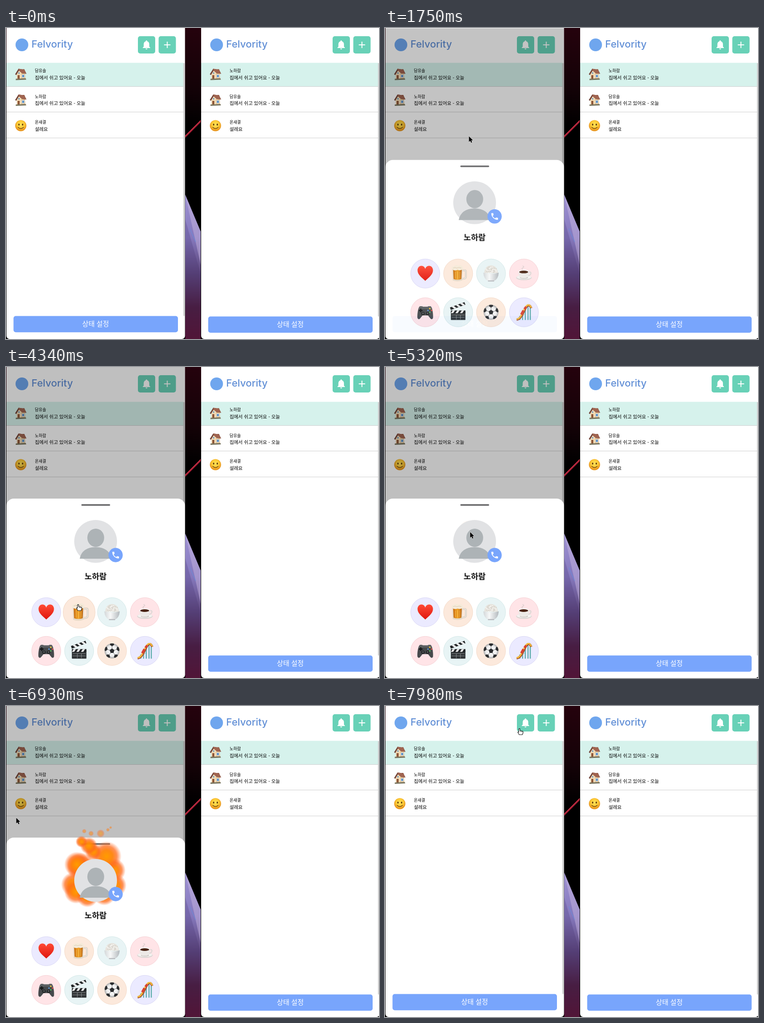
An HTML page that plays this animation: 820x683 px, repeating every 8 s.

```html
<!DOCTYPE html>
<html lang="ko">
<head>
<meta charset="utf-8">
<title>Status board</title>
<style>
html, body { margin: 0; width: 100%; height: 100%; overflow: hidden; background: #000; }
svg { display: block; width: 820px; height: 683px; font-family: "Noto Sans CJK KR", "Noto Sans CJK", "Noto Sans", sans-serif; }
.brand { font: 500 22px Inter, sans-serif; fill: #618fd6; }
.who { font-size: 9px; }
.mood { font-size: 10.4px; font-weight: 500; }
.cta { font-size: 14.9px; font-weight: 500; fill: #fff; text-anchor: middle; }
.name { font-size: 17.6px; font-weight: 600; text-anchor: middle; fill: #111; }
</style>
</head>
<body>
<svg id="stage" viewBox="0 0 820 683" xmlns="http://www.w3.org/2000/svg"></svg>
<script>
const LOOP = 8000;
const stage = document.getElementById('stage');
const BELL = 'M12 22c1.1 0 2-.9 2-2h-4c0 1.1.89 2 2 2zm6-6v-5c0-3.07-1.64-5.64-4.5-6.32V4c0-.83-.67-1.5-1.5-1.5s-1.5.67-1.5 1.5v.68C7.63 5.36 6 7.92 6 11v5l-2 2v1h16v-1l-2-2z';
const PHONE = 'M6.6 10.8c1.4 2.8 3.8 5.1 6.6 6.6l2.2-2.2c.3-.3.7-.4 1-.2 1.1.4 2.3.6 3.6.6.6 0 1 .4 1 1V20c0 .6-.4 1-1 1-9.4 0-17-7.6-17-17 0-.6.4-1 1-1h3.5c.6 0 1 .4 1 1 0 1.2.2 2.4.6 3.6.1.3 0 .7-.3 1l-2.2 2.2z';

const at = (x, y, body, s = 1, id = '') =>
  `<g ${id && `id="${id}"`} transform="translate(${x} ${y}) scale(${s})">${body}</g>`;
const path = (d, fill, more = '') => `<path d="${d}" fill="${fill}" ${more}/>`;
const line = (d, stroke, w, more = '') => path(d, 'none', `stroke="${stroke}" stroke-width="${w}" ${more}`);
const rect = (x, y, w, h, fill, r = 0, more = '') =>
  `<rect x="${x}" y="${y}" width="${w}" height="${h}" rx="${r}" fill="${fill}" ${more}/>`;
const oval = (x, y, rx, ry, fill, more = '') =>
  `<ellipse cx="${x}" cy="${y}" rx="${rx}" ry="${ry}" fill="${fill}" ${more}/>`;
const text = (x, y, cls, s) => `<text x="${x}" y="${y}" class="${cls}">${s}</text>`;
const grad = (id, kind, stops, more = '') => `<${kind}Gradient id="${id}" ${more}>` +
  stops.map(([o, c, a = 1]) => `<stop offset="${o}" stop-color="${c}" stop-opacity="${a}"/>`).join('') +
  `</${kind}Gradient>`;

// Pictograms, centred on 0,0
const house =
  rect(4, -11, 4, 7, '#8a4a3b') +
  path('M-9-1L-4-8L9-6L10 10L-9 11Z', '#f3dcb6') +
  path('M1-4L9-3L10 10L1 11Z', '#dfc194') +
  path('M-12.5 0L-5-12L8-10L12.5-1L3-2L-4-8L-10 2Z', '#74463a') +
  path('M-4-8L-5-12L8-10L12 -1L3-2Z', '#a06450') +
  rect(-7, 2, 4.5, 9, '#8d5638') + rect(2.5, 1, 5.5, 6, '#5d91c4', .5, 'stroke="#fff" stroke-width=".8"') +
  rect(-5.5, -4, 3, 3, '#6d99bd') +
  path('M-11 10L11 9L12 12L-11 13Z', '#79755f');
const smile =
  oval(0, 0, 12.3, 12.2, 'url(#face)') +
  oval(-4, -2.4, 1.5, 2.2, '#5f3a0c') + oval(4, -2.4, 1.5, 2.2, '#5f3a0c') +
  line('M-6 3.5Q0 9.2 6 3.5', '#6d430f', 1.4, 'stroke-linecap="round"');
const heart = path('M0 16C-6 10-17 3-17-7C-17-13-13-17-8.500-17C-4-17-1-14 0-10C1-14 4-17 8.500-17C13-17 17-13 17-7C17 3 6 10 0 16Z', 'url(#red)');
const beer =
  line('M8-7H15Q17-7 17-4V7Q17 10 14 11L8 12', '#cfc6ba', 3.6) +
  line('M8-7H15Q17-7 17-4V7Q17 10 14 11L8 12', '#f4efe8', 1.4) +
  path('M-13-12H10L9 15Q-2 19-12 15Z', '#e6d9c6') +
  path('M-11-10H8L7 12Q-2 15-10 12Z', 'url(#ale)') +
  line('M-6-4V11M-1-4V12M4-4V11', '#ffd06a', 1.2, 'opacity=".6"') +
  path('M-14-10Q-16-16-9-16Q-5-20 0-17Q7-20 10-14Q13-8 7-8Q3-6-1-8Q-8-5-14-10Z', '#f5ead9') +
  line('M-11-12Q-7-15-3-12Q2-15 7-12', '#dbcab2', 1);
const grains = Array.from({ length: 30 }, (_, i) => {
  const a = i * 2.4, r = 2.4 * Math.sqrt(i);
  return oval((r * Math.cos(a)).toFixed(1), (-8 + r * Math.sin(a) * .55).toFixed(1), 1.3, .8, i % 2 ? '#fff' : '#cdcac2');
}).join('');
const rice =
  path('M-15-1Q-14-17 0-18Q14-17 15-1Z', '#e6e3dc') + grains +
  path('M-17-2Q0 3 17-2Q16 12 7 16H-7Q-16 12-17-2Z', 'url(#bowl)') +
  rect(-7, 15, 14, 2.500, '#b9bcc0', 1);
const coffee =
  oval(0, 9, 17, 5.500, '#d6d3d0') + oval(0, 8, 16, 4.500, '#f4f2f0') + oval(0, 9, 9, 2.500, '#c9c4c0') +
  line('M9-3Q17-5 15 1Q13 5 7 5', '#dcd8d5', 2.2) +
  path('M-12-4H11Q11 9 3 10H-4Q-12 9-12-4Z', '#ece9e6') +
  oval(-.5, -4, 11.500, 4, '#fff') + oval(-.5, -3.500, 10, 3, '#4a2414') +
  line('M-3-8Q-6-11-2-13T-3-17', '#c9c3c0', 1.4, 'opacity=".7"');
const pad =
  path('M-12-13Q-7-14-5-12H5Q7-14 12-13C16-10 18 6 17 13Q14 18 10 12L6 7H-6L-10 12Q-14 18-17 13C-18 6-16-10-12-13Z', '#46494c') +
  path('M-12-13Q-7-14-5-12H5Q7-14 12-13Q15-10 15-6Q0-9-15-6Q-15-10-12-13Z', '#5b5f62') +
  line('M-10-8V0M-14-4H-6', '#17191a', 2.8) +
  [[10, -8, '#e9c341'], [10, 0, '#56b35f'], [6, -4, '#5a94d6'], [14, -4, '#dd5348']].map(([x, y, c]) => oval(x, y, 1.7, 1.7, c)).join('') +
  oval(-5, 3, 3.700, 3.700, '#1e2021') + oval(5, 3, 3.700, 3.700, '#1e2021') +
  oval(-5, 2.500, 2, 2, '#55595c') + oval(5, 2.500, 2, 2, '#55595c');
const clap =
  rect(-16, -1, 32, 18, '#2f3335', 1) + rect(-16, -4, 32, 6, '#202325') +
  path('M-12-4h5l-4 6h-5zM-2-4h5l-4 6h-5zM8-4h5l-4 6h-5z', '#f1f1f1') +
  line('M-14 6H14M-14 11H14M-4 6V16M5 6V16', '#aeb3b5', .7) +
  `<g transform="translate(-16 -5) rotate(-20)">${rect(0, -6, 34, 6, '#202325')}${path('M4-6h5l4 6h-5zM14-6h5l4 6h-5zM24-6h5l4 6h-5z', '#f1f1f1')}</g>`;
const penta = (x, y, r, turn) => path('M' + [0, 1, 2, 3, 4].map(i => {
  const a = turn + i * Math.PI * .4;
  return (x + r * Math.sin(a)).toFixed(1) + ' ' + (y - r * Math.cos(a)).toFixed(1);
}).join('L') + 'Z', '#2b2d2f');
const ball = oval(0, 0, 16.5, 16.5, 'url(#leather)') + penta(0, 0, 5.5, 0) +
  [0, 1, 2, 3, 4].map(i => {
    const a = i * Math.PI * .4, s = Math.sin(a), c = -Math.cos(a);
    return `<g clip-path="url(#round)">${penta(15 * s, 15 * c, 5, a + Math.PI)}</g>` + line(`M${5 * s} ${5 * c}L${11 * s} ${11 * c}`, '#777', 1);
  }).join('');
const coaster =
  line('M-9 8V17M-3 1V17M3-7V17M9-12V17M14-12V17', '#52a7a5', 2.2) +
  line('M-9 13L-3 8M-3 9L3 3', '#78b9b6', 1) +
  line('M-16 16C-8 16-3 4 2-6C7-17 13-18 16-9', '#a64d2c', 5) +
  line('M-16 15C-8 15-4 3 1-7C6-18 13-19 16-10', '#f4bd38', 3) +
  line('M-6 5L-1-4', '#d94232', 5) + line('M1-7L5-12', '#d94232', 5);

function page(dx, dy, names) {
  const rows = names.map((n, i) => {
    const y = i * 56.5;
    return at(32.500, 101.500 + y, i < 2 ? house : smile) +
      text(63.5, 97 + y, 'who', n) +
      text(63.5, 112.800 + y, 'mood', i < 2 ? '집에서 쉬고 있어요 - 오늘' : '설레요') +
      rect(1, [128, 184, 241][i], 389, 1, '#cfcfcf');
  }).join('');
  return at(dx, 0,
    rect(1, -20, 392.500, 703, '#fff', 7) +
    oval(35, 37, 14, 14, '#6fa6ee') + text(56, 43.3, 'brand', 'Felvority') +
    rect(290, 18, 38, 38, '#68d1b7', 5) + rect(335.5, 18, 38, 38, '#68d1b7', 5) +
    at(296.6, 24.6, path(BELL, '#fff'), 1.02) +
    line('M347.5 37H361.500M354.500 30V44', '#fff', 2) +
    rect(1, 76.5, 389, 51.5, '#d6f2ec') + rows +
    rect(389.700, 77, 3, 555.5 + dy, '#d2d2d2', 1) +
    rect(16.5, 632.5 + dy, 361.5, 35.700, '#78a5fc', 5) +
    text(197, 655.3 + dy, 'cta', '상태 설정'));
}

const names = ['담유솔', '노하람', '온새결'];
const tints = { a: ['#ebeaff', '#d9d7f5'], b: ['#fce9dc', '#f4dac8'], c: ['#e8f4f5', '#d3e8e8'], d: ['#ffe4e7', '#f6d0d4'] };
const moods = [['a', heart], ['b', beer], ['c', rice], ['d', coffee], ['d', pad], ['c', clap], ['b', ball], ['a', coaster]];
const spot = i => [88.5 + (i % 4) * 72.3, i < 4 ? 538.5 : 623.5];

// Flames: x, y, radius, then drift in x, y, radius
const flames = [
  [170, 341, 31, -4, 13, 1], [151, 384, 25, -3, 8, 2], [157, 411, 26, -3, -3, 0],
  [183, 418, 26, -4, 0, -2], [214, 415, 28, 2, -2, -3], [240, 396, 28, -1, -2, -2],
  [236, 362, 27, 0, -1, 0], [210, 351, 24, 11, -21, 9], [152, 358, 22, 4, -10, 6],
  [190, 338, 18, 2, -18, 0], [180, 344, 17, 2, -37, 2], [172, 340, 16, -6, -42, -3]
];
const sparks = [[172, 275, 5], [187, 280, 6], [208, 280, 9], [224, 272, 4], [230, 267, 3]];
const blobs = (list, cls) => list.map(() => `<circle class="${cls}" fill="url(#flame)"/>`).join('');

const sheet =
  rect(1, 289, 392.5, 430, '#fff', 16) + rect(165.5, 301.2, 63.5, 3.6, '#69696b', 1.8) +
  `<g id="fire">${blobs(flames, 'flame')}${blobs(sparks, 'spark')}</g>` +
  oval(197, 383, 47, 47, '#e1e2e4') + oval(197.3, 375, 18.5, 20, '#adb3b6') +
  path('M162 421Q167 396 197 395.500Q227 396 232 421Z', '#adb3b6') +
  oval(241, 413, 15.7, 15.7, '#78a5fc') + at(231.2, 403.2, path(PHONE, '#fff'), .82) +
  text(197, 465.7, 'name', names[1]) +
  moods.map(([k, art], i) => at(...spot(i), oval(0, 0, 32, 32, tints[k][0], `stroke="${tints[k][1]}"`) + art, 1, 'mood' + i)).join('');

const wall = rect(0, 0, 820, 683, '#000') + rect(0, 0, 430, 215, 'url(#dusk)') +
  path('M394 236L428 202V207L394 241Z', '#a91e35') + line('M394 237L428 203', '#f04b5c', 1) +
  path('M394 366L428 447V683H394Z', 'url(#beam)') +
  path('M394 366L428 447V520Z', '#c9b9e0', 'opacity=".45"') +
  path('M394 420L428 540V683H394Z', '#3b2c6a', 'opacity=".22"') +
  line('M404 440L417 470', '#688fdc', 1.5, 'opacity=".7"');

const user = 'gradientUnits="userSpaceOnUse" x1="0" x2="0"';
stage.innerHTML = '<defs>' +
  grad('dusk', 'linear', [[0, '#25020d'], [.6, '#140207'], [1, '#000']], 'x2="0" y2="1"') +
  grad('beam', 'linear', [[0, '#9d92d2'], [.3, '#8578bd'], [.55, '#5b4478'], [.78, '#4b1a38'], [1, '#570f29']], user + ' y1="366" y2="683"') +
  grad('face', 'radial', [[0, '#ffe25a'], [.65, '#fdcb36'], [1, '#ea9a22']], 'cy=".4"') +
  grad('red', 'linear', [[0, '#ff4a36'], [1, '#df160d']], 'x2="0" y2="1"') +
  grad('ale', 'linear', [[0, '#c76a0e'], [.5, '#f2a528'], [1, '#b8600c']]) +
  grad('bowl', 'linear', [[0, '#d3d7d9'], [.4, '#f7f8f8'], [1, '#b3b9bd']]) +
  grad('leather', 'radial', [[0, '#fff'], [.7, '#eee'], [1, '#a9a9a9']]) +
  grad('flame', 'radial', [[0, '#ff9c00'], [.4, '#ff8308', .95], [.68, '#ff6a1a', .75], [1, '#ff6420', 0]]) +
  '<clipPath id="round"><circle r="16.5"/></clipPath>' +
  `<clipPath id="pane">${rect(1, -20, 392.5, 703, '#fff', 7)}</clipPath></defs>` +
  wall + page(0, 0, names) + page(428, 1, [names[1], names[0], names[2]]) +
  `<g clip-path="url(#pane)"><g id="modal">${rect(1, 0, 392.5, 720, '#000', 0, 'opacity=".25"')}${sheet}</g></g>` +
  at(0, 0, path('M0 0V12.500L2.900 9.900L4.900 14.200L7 13.200L5.100 9H9Z', '#000', 'stroke="#fff" stroke-width="1" paint-order="stroke"'), 1, 'arrow') +
  at(0, 0, path('M-1.400 1Q0-.800 1.400 1V5L5 5.200L8 6.500V9.500L6.500 13.500H-.5L-3.500 8.500Q-3.500 6.500-1.400 8Z', '#fff', 'stroke="#111" stroke-width="1.1" stroke-linejoin="round"') + line('M3 5V7.500M5.500 5.500V8', '#111', .8), 1, 'hand');

const el = id => document.getElementById(id);
const modal = el('modal'), fire = el('fire'), arrow = el('arrow'), hand = el('hand'), mug = el('mood1');
const flameEls = [...stage.querySelectorAll('.flame')], sparkEls = [...stage.querySelectorAll('.spark')];

const clamp = v => Math.max(0, Math.min(1, v));
const smooth = v => (v = clamp(v), v * v * (3 - 2 * v));
const span = (t, a, b) => smooth((t - a) / (b - a));

const route = [
  [480, 240, 700], [1050, 189.5, 165.5], [1600, 189.5, 165.5], [2120, 165, 520], [2500, 152, 530],
  [2870, 173.5, 492.5], [3220, 156, 517], [3600, 163, 530], [3980, 160, 524], [4340, 158.5, 521.5],
  [4620, 165, 446], [4970, 171.5, 374], [5040, 171.5, 374], [5110, 196, 357.5], [5250, 190, 362],
  [6020, 72.5, 380], [6800, 22.5, 245.5], [7200, 22.5, 245.5], [7720, 253, 57], [7960, 295.5, 49.5]
];

function pointer(t) {
  const i = route.findIndex(k => k[0] > t);
  if (i === 0) return [240, 700];
  if (i < 0) return route[route.length - 1].slice(1);
  const [a, x, y] = route[i - 1], [b, p, q] = route[i], k = span(t, a, b);
  return [x + (p - x) * k, y + (q - y) * k];
}

function circle(node, x, y, r, alpha) {
  node.setAttribute('cx', x);
  node.setAttribute('cy', y);
  node.setAttribute('r', Math.max(0, r));
  node.setAttribute('opacity', alpha);
}

function burn(t) {
  const u = (t - 6020) / 910, grow = span(t, 5180, 5850), drift = clamp(u);
  fire.style.display = grow > 0 ? '' : 'none';
  flames.forEach(([x, y, r, dx, dy, dr], i) => {
    const wave = Math.sin(Math.PI * u * (2 + i % 2)) * 3;
    const px = x + dx * drift + wave, py = y + dy * drift - Math.abs(wave);
    circle(flameEls[i], 197 + (px - 197) * (.6 + .4 * grow), 383 + (py - 383) * (.6 + .4 * grow), (r + dr * drift) * (.5 + .5 * grow), grow);
  });
  sparks.forEach(([x, y, r], i) => circle(sparkEls[i], x, y + (1 - u) * 75, r, .55 * clamp(u * 2.2 - 1.1)));
}

function draw(t) {
  const shown = span(t, 1320, 1820) * (1 - span(t, 6935, 7435));
  modal.style.display = shown > 0 ? '' : 'none';
  modal.setAttribute('opacity', shown);
  modal.setAttribute('transform', `translate(0 ${15 * (1 - shown)})`);
  burn(t);

  const hover = span(t, 2060, 2200) - span(t, 2700, 2850) + span(t, 3050, 3200) - span(t, 4480, 4680);
  mug.setAttribute('transform', `translate(${spot(1).join(' ')}) scale(${1 + .1 * hover})`);
  mug.firstChild.setAttribute('stroke-width', 1);

  const [x, y] = pointer(t);
  const onMug = t > 2000 && t < 4700 && Math.hypot(x - 161, y - 538.5) < 33;
  const onBell = x > 290 && x < 328 && y > 18 && y < 56;
  const link = onMug || onBell;
  arrow.setAttribute('transform', `translate(${x} ${y})`);
  hand.setAttribute('transform', `translate(${x} ${y})`);
  arrow.style.display = link ? 'none' : '';
  hand.style.display = link ? '' : 'none';
}

const start = performance.now();
function tick(now) {
  draw(Math.max(0, now - start) % LOOP);
  requestAnimationFrame(tick);
}
draw(0);
requestAnimationFrame(tick);
</script>
</body>
</html>
```
